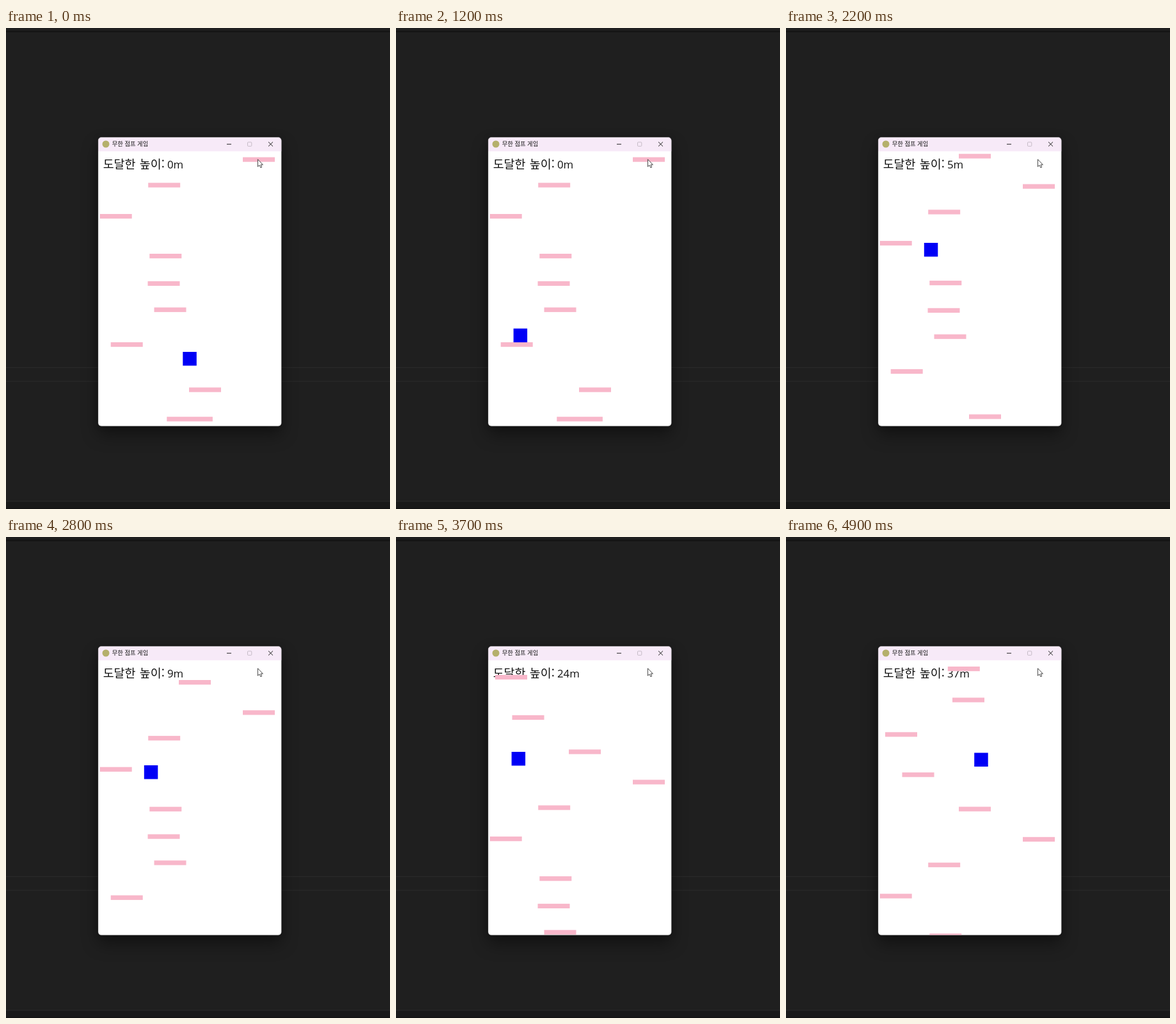
Recreate the animation shown at these times as an HTML page. Size 600 by 750 pixels, loop 5000 ms.

```html
<!DOCTYPE html>
<html lang="ko">
<head>
<meta charset="utf-8">
<style>
html, body { margin: 0; width: 100%; height: 100%; overflow: hidden; background: #1f1f1f; }
#stage { position: relative; width: 600px; height: 750px; overflow: hidden; }
#shadow {
  position: absolute; left: 144px; top: 170.5px; width: 286px; height: 450px; border-radius: 5px;
  box-shadow: 0 13px 26px rgba(0, 0, 0, .42), 0 0 9px rgba(0, 0, 0, .25);
}
svg { position: absolute; left: 0; top: 0; display: block; }
text { font-family: "Noto Sans CJK KR", "Noto Sans CJK", "Noto Sans CJK JP", sans-serif; fill: #111; }
#score { font-family: "Open Sans", "Noto Sans", sans-serif; }
</style>
</head>
<body>
<div id="stage">
  <svg width="600" height="750">
    <path d="M0 5.5H600" stroke="#131313" stroke-width="2"/>
    <path d="M0 529.5H600M0 551H600" stroke="#2a2a2a"/>
    <path d="M0 738H600V750H0Z" fill="#191919"/>
    <path d="M0 738H600" stroke="#2a2a2a"/>
    <path d="M0 749H600" stroke="#141414" stroke-width="2"/>
  </svg>
  <div id="shadow"></div>
  <svg width="600" height="750">
    <clipPath id="frame"><rect x="144" y="170.5" width="286.3" height="450.3" rx="5"/></clipPath>
    <clipPath id="view"><rect x="144" y="192" width="287" height="429"/></clipPath>
    <g clip-path="url(#frame)">
      <rect x="144" y="170" width="287" height="452" fill="#fff"/>
      <rect x="144" y="170" width="287" height="22.3" fill="#f7eaf8"/>
      <circle cx="156" cy="181" r="5.5" fill="#b5b06c"/>
      <text x="165.7" y="184.3" font-size="9.3">무한 점프 게임</text>
      <g fill="none" stroke="#222">
        <path d="M345 181.2H352"/>
        <rect x="377.5" y="178" width="6.3" height="6.3" rx="1" stroke="#c6bcc7"/>
        <path d="M410 177.7L417 184.5M417 177.7L410 184.5"/>
      </g>
      <text x="151.7" y="218.5" font-size="18.4" word-spacing="1.2">도달한 높이:</text>
      <text id="score" x="252" y="218.5" font-size="16.8"></text>
      <g clip-path="url(#view)">
        <g id="world" fill="#f8b7ca"></g>
        <rect id="player" width="21.5" height="21.5" fill="#0000f6"/>
      </g>
    </g>
    <rect x="144" y="170.5" width="286.3" height="450.3" rx="5" fill="none" stroke="#777" stroke-opacity=".6" stroke-width=".7"/>
    <path d="M393.4 204.8V216.2L396 213.9L397.9 217.8L399.7 217L398 213.2H401.4Z" fill="#fff" stroke="#333" stroke-width=".9"/>
  </svg>
</div>
<script>
const STEP = 100, LOOP = 5000, CAMERA_Y = 335, PX_PER_M = 7.145;
const $ = id => document.getElementById(id);

// left edge, top edge, width
const platforms = [
  [251.3, 606.2, 71.6], [286, 560.5], [163.7, 490], [231.5, 435.7], [221.5, 394.8],
  [224.3, 352], [146.7, 290], [222.2, 241.4], [370, 201.5], [270, 154.3],
  [181.5, 100.8], [155, 38], [260, -15.8], [252.8, -64.3]
];
$('world').innerHTML = platforms.map(([x, y, w = 50]) =>
  `<rect x="${x}" y="${y}" width="${w}" height="7.2"/>`).join('');

const linear = p => p, rise = p => 1 - (1 - p) ** 2, fall = p => p * p;

// time, value, easing used on the way to it
const xKeys = [
  [0, 276.3], [700, 276.3], [1100, 183.6], [1400, 183.6], [1700, 215.8], [3080, 215.8],
  [3300, 169.3], [3600, 169.3], [4200, 237], [4480, 237], [4900, 294.2]
];
const yKeys = [
  [0, 505], [300, 539, fall], [700, 539], [900, 445, rise], [1100, 468.6, fall], [1400, 468.6],
  [1800, 376, rise], [1900, 373.3], [2000, 373.3], [2400, 266.3, rise], [3100, 330.5, fall],
  [3300, 207.2, rise], [3800, 155.9, rise], [4480, 219.9, fall], [4850, 68.7, rise], [4900, 70.2]
];

function track(keys, t) {
  const i = keys.findIndex(k => k[0] > t);
  if (i < 0) return keys[keys.length - 1][1];
  const [t0, a] = keys[i - 1], [t1, b, ease = linear] = keys[i];
  return a + (b - a) * ease((t - t0) / (t1 - t0));
}

// The camera only climbs, keeping the player below CAMERA_Y.
function cameraAt(t) {
  let top = CAMERA_Y;
  for (let s = 0; s <= t; s += 10) top = Math.min(top, track(yKeys, s));
  return CAMERA_Y - top;
}

function draw(now) {
  const t = Math.floor(now % LOOP / STEP) * STEP;
  const scroll = cameraAt(t);
  $('world').setAttribute('transform', `translate(0 ${scroll})`);
  $('player').setAttribute('x', track(xKeys, t));
  $('player').setAttribute('y', track(yKeys, t) + scroll);
  $('score').textContent = Math.floor(scroll / PX_PER_M) + 'm';
}

let start;
function tick(now) {
  start ??= now;
  draw(now - start);
  requestAnimationFrame(tick);
}
draw(0);
requestAnimationFrame(tick);
</script>
</body>
</html>
```
